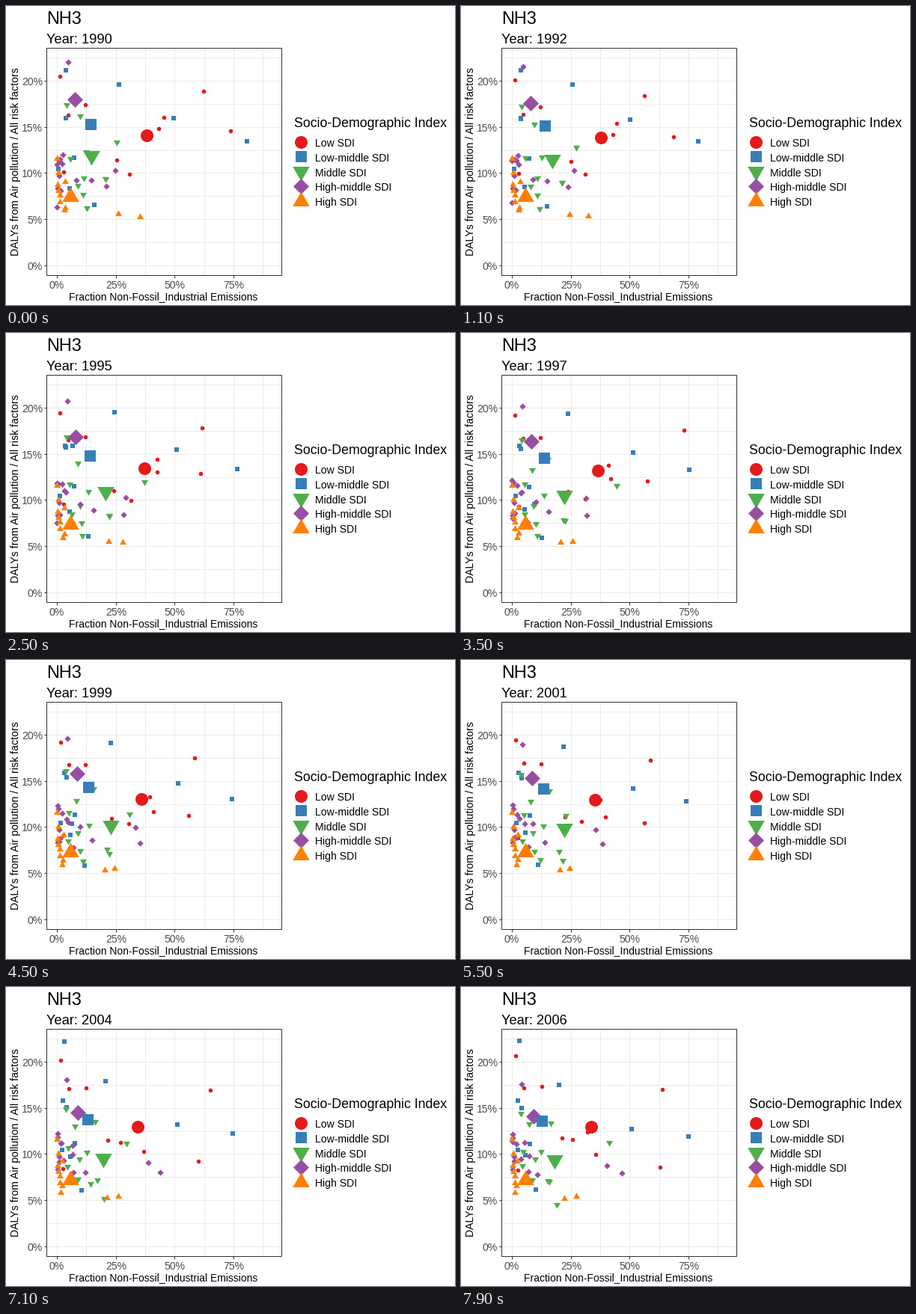
A matplotlib script for the animation above (8000 ms loop, 600 px wide and 400 px high).

```python
import matplotlib.pyplot as plt
import numpy as np
from matplotlib.animation import FuncAnimation

W, H, DPI = 600, 400, 100
PX = 72 / DPI            # points per pixel
STEPS = 38               # moves in one loop

plt.rcParams["font.family"] = "Liberation Sans"
fig = plt.figure(figsize=(W / DPI, H / DPI), dpi=DPI, facecolor="white")
ax = fig.add_axes([0, 0, 1, 1])
ax.set(xlim=(0, W), ylim=(H, 0))
ax.axis("off")

# name: colour, marker, large and small size (diameter or side in pixels)
STYLE = {
    "Low": ("#E41A1C", "o", 17, 5.6),
    "Low-middle": ("#377EB8", "s", 15, 6),
    "Middle": ("#4DAF4A", (3, 0, 180), 26, 10.5),
    "High-middle": ("#984EA3", (4, 0, 0), 21, 8.4),
    "High": ("#FF7F00", (3, 0, 0), 26, 10.5),
}
BIG_ORDER = ("High-middle", "High", "Low-middle", "Low", "Middle")


def text(x, y, s, size, color="black", **kw):
    return ax.text(x, y, s, fontsize=size * PX, color=color, va="baseline", **kw)


def line(x0, x1, y0, y1, color, z):
    ax.plot([x0, x1], [y0, y1], color=color, lw=PX, zorder=z,
            solid_capstyle="butt")


def marks(name, size, z):
    color, marker = STYLE[name][:2]
    return ax.scatter([], [], s=(size * PX) ** 2, c=color, marker=marker,
                      linewidths=0, antialiased=False, zorder=z)


def drift(start, end=None, bow=(0, 0)):
    """Straight path, pushed sideways by bow at half time."""
    a, b, bow = np.array(start), np.array(end or start), np.array(bow)
    return lambda t: a + (b - a) * t + bow * np.sin(np.pi * t)


def hops(*points):
    """Straight legs of equal time."""
    xs, ys = zip(*points)
    times = np.linspace(0, 1, len(points))
    return lambda t: (np.interp(t, times, xs), np.interp(t, times, ys))


# Paths in pixels
large = {
    "Low": drift((188, 173), (174, 187), (1, 5)),
    "Low-middle": drift((113, 158), (108, 179)),
    "Middle": drift((114, 200), (125, 231), (20, 4)),
    "High-middle": drift((92, 125), (97, 173)),
    "High": drift((86, 255), (86, 258)),
}
small = {
    "Low": [
        drift((72, 94), (73, 92), (0, 17)),
        drift((83, 146), (84, 135)),
        drift((106, 132), (108, 133), (-1, 8)),
        hops((264, 114), (228, 125), (305, 130), (236, 131), (277, 139), (269, 137)),
        drift((300, 167), (266, 241), (-38, 0)),
        drift((211, 149), (169, 194), (4, 9)),
        drift((204, 164), (180, 224), (6, 6)),
        drift((148, 206), (135, 202), (0, 8)),
        drift((165, 225), (149, 204), (8, 6)),
        drift((77, 222), (76, 245)),
    ],
    "Low-middle": [
        hops((80, 86), (80, 86), (100, 231), (84, 215), (78, 74), (78, 72)),
        drift((80, 150), (76, 152)),
        drift((80, 150), (81, 162)),
        drift((151, 105), (131, 131), (0, -8)),
        drift((224, 150), (228, 190), (4, -7)),
        drift((322, 181), (304, 200), (-10, -6)),
        drift((91, 203), (92, 210)),
        drift((70, 218), (76, 218)),
        drift((118, 266), (100, 271), (-3, 6)),
        drift((85, 244), (86, 225)),
    ],
    "Middle": [
        drift((81, 132), (80, 169), (0, -5)),
        drift((99, 147), (91, 183), (-1, 21)),
        hops((148, 182), (160, 195), (215, 204), (150, 207), (127, 210), (198, 208)),
        drift((113, 160), (120, 182)),
        drift((86, 204), (83, 220), (0, -9)),
        drift((107, 195), (107, 220), (4, 12)),
        drift((104, 230), (99, 230), (-5, 1)),
        drift((133, 231), (116, 259), (12, 7)),
        drift((96, 240), (82, 239), (-5, 3)),
        drift((103, 252), (95, 258)),
        drift((108, 270), (118, 260), (-11, 5)),
        drift((133, 231), (128, 291), (8, -5)),
    ],
    "High-middle": [
        drift((83, 75), (81, 130)),
        drift((68, 212), (69, 197), (0, -9)),
        drift((71, 207), (69, 202), (0, -5)),
        drift((76, 199), (74, 210)),
        drift((75, 211), (69, 207), (9, 4)),
        drift((94, 233), (85, 208), (10, 4)),
        drift((114, 233), (102, 251), (8, -2)),
        drift((134, 241), (215, 249)),
        drift((146, 220), (195, 239), (0, -7)),
        drift((73, 247), (71, 233)),
        drift((68, 269), (80, 230), (-4, -5)),
        drift((89, 257), (90, 247)),
        drift((72, 205), (91, 226)),
        drift((71, 227)),
        drift((69, 244)),
    ],
    "High": [
        drift((68, 204)),
        drift((70, 223)),
        drift((69, 239)),
        drift((70, 247)),
        drift((72, 253)),
        drift((72, 262)),
        drift((91, 259)),
        drift((79, 235), (75, 233)),
        drift((79, 270), (74, 266)),
        drift((78, 273), (72, 275)),
        drift((150, 278), (138, 283), (-12, 0)),
        drift((179, 282), (154, 280), (-20, -2)),
    ],
}

# Panel: grid, ticks, border
LEFT, RIGHT, TOP, BOTTOM = 54, 368, 56, 360
GRID, DARK, GREY = "#EBEBEB", "#333333", "#4D4D4D"
for i in range(8):
    x = round(68 + 39.32 * i)
    line(x, x, TOP, BOTTOM, GRID, 1)
    if i % 2 == 0:
        line(x, x, BOTTOM, BOTTOM + 4, DARK, 2)
        text(x, 378, f"{i // 2 * 25}%", 14, GREY, ha="center")
for i in range(10):
    y = round(347.2 - 30.93 * i)
    line(LEFT, RIGHT, y, y, GRID, 1)
    if i % 2 == 0:
        line(LEFT - 3, LEFT, y, y, DARK, 2)
        text(49, y + 5.8, f"{i // 2 * 5}%", 14, GREY, ha="right")
ax.add_patch(plt.Rectangle((LEFT, TOP), RIGHT - LEFT, BOTTOM - TOP, fill=False,
                           ec=DARK, lw=PX, zorder=20, snap=True))

text(54, 24, "NH3", 23.5)
year = text(54, 50, "", 18.3)
text(210.5, 393, "Fraction Non-Fossil_Industrial Emissions", 13.9, ha="center")
text(17, 208, "DALYs from Air pollution / All risk factors", 14.1, ha="center",
     rotation=90, rotation_mode="anchor")

# Legend
text(385, 162, "Socio-Demographic Index", 17.7)
for i, name in enumerate(STYLE):
    y = 181.5 + 19.9 * i
    key = marks(name, STYLE[name][2], 5)
    key.set_offsets([(394, y)])
    text(413, y + 6.3, f"{name} SDI", 14)

layers = [(marks(n, STYLE[n][3], 6 + i), small[n]) for i, n in enumerate(STYLE)]
layers += [(marks(n, STYLE[n][2], 12 + i), [large[n]])
           for i, n in enumerate(BIG_ORDER)]


def draw(frame):
    # hold 500 ms, then one move every 200 ms
    t = max(0, (frame - 3) // 2) / STEPS
    year.set_text(f"Year: {round(1990 + 16 * t)}")
    for marker, paths in layers:
        marker.set_offsets([path(t) for path in paths])
    return [year] + [marker for marker, _ in layers]


anim = FuncAnimation(fig, draw, frames=80, interval=100, repeat=True,
                     repeat_delay=0, blit=False)
plt.show()
```
